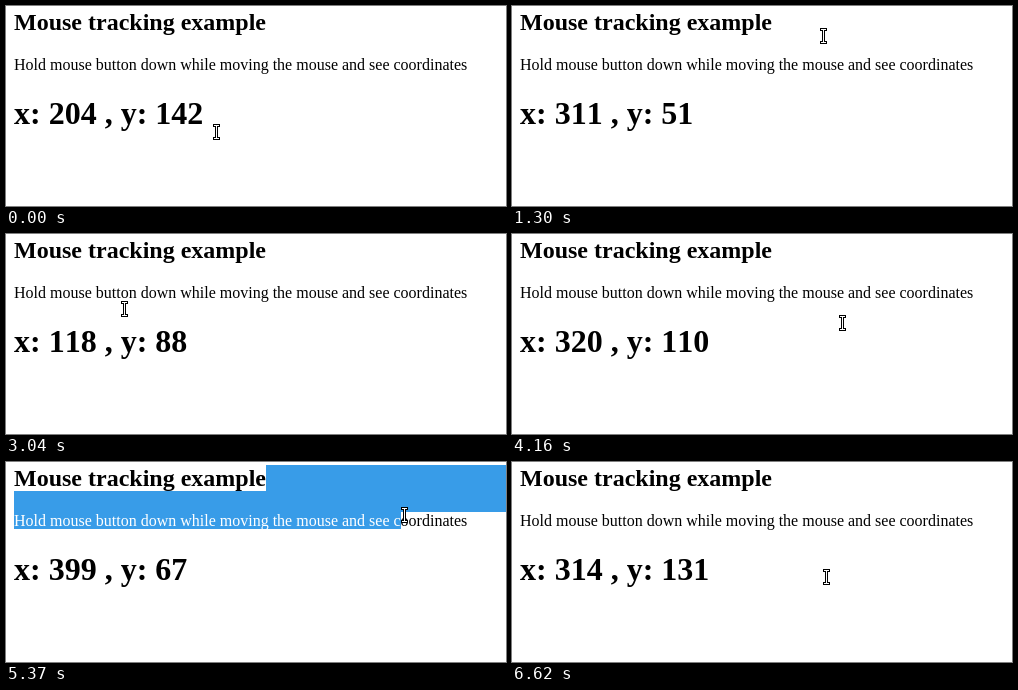
Recreate the animation shown at these times as an HTML page. Size 500 by 200 pixels, loop 6.66 s.

```html
<!DOCTYPE html>
<html lang="en">
<head>
<meta charset="utf-8">
<title>Mouse tracking example</title>
<style>
  html, body { margin: 0; width: 100%; height: 100%; overflow: hidden; background: #fff; }
  svg { display: block; }
  text { font-family: "Liberation Serif", "Times New Roman", serif; font-size: 16px; white-space: pre; }
  .h1 { font-size: 32px; font-weight: bold; font-kerning: none; }
  .h2 { font-size: 24px; font-weight: bold; }
</style>
</head>
<body>
<svg width="500" height="200" viewBox="0 0 500 200">
  <g id="selection" fill="#389ce8" shape-rendering="crispEdges">
    <rect x="260" y="3" width="240" height="26"/>
    <rect x="8" y="29" width="492" height="21"/>
    <rect id="lineBox" x="8" y="50" width="492" height="17"/>
  </g>
  <text class="h2" x="8" y="24">Mouse tracking example</text>
  <text id="line" x="8" y="64"><tspan id="lit" fill="#fff"></tspan><tspan id="plain"></tspan></text>
  <text id="readout" class="h1" x="8" y="118"></text>
  <g id="cursor" shape-rendering="crispEdges">
    <path d="M-3-8h7v3h-2v10h2v3h-7v-3h2v-10h-2z"/>
    <path fill="#fff" d="M-2-7h5v1h-2v12h2v1h-5v-1h2v-12h-2z"/>
  </g>
</svg>
<script>
const LOOP = 6660, DELAY = 40, LEFT = 8, RIGHT = 500;
const SENTENCE = "Hold mouse button down while moving the mouse and see coordinates";

// Turning points and rests of the pointer: time in ms, x, y
const path = [
  [-40, 204, 126], [0, 210, 126], [360, 252, 124], [500, 252, 124],
  [940, 317, 72], [1300, 311, 30], [1440, 312, 14], [1780, 312, 14],
  [2400, 173, 17], [2500, 165, 20], [2880, 119, 64], [3040, 118, 75], [3160, 118, 88], [3530, 118, 88],
  [3860, 215, 119], [4200, 335, 84], [4600, 346, 30], [4800, 338, 13], [4910, 337, 15],
  [4950, 357, 24], [5200, 400, 44], [5530, 395, 61], [5670, 387, 70], [5920, 387, 70],
  [6550, 322, 125], [6580, 314, 115]
];

const $ = id => document.getElementById(id);
const selection = $("selection"), lineBox = $("lineBox"), line = $("line");
const lit = $("lit"), plain = $("plain"), readout = $("readout"), cursor = $("cursor");

const slope = (i, k) => (path[i + 1][k] - path[i][k]) / (path[i + 1][0] - path[i][0]);

// Flat at turning points and rests, otherwise the harmonic mean of both slopes
function tangent(i, k) {
  if (i === 0) return slope(0, k);
  if (i === path.length - 1) return slope(i - 1, k);
  const a = slope(i - 1, k), b = slope(i, k);
  return a * b <= 0 ? 0 : 2 * a * b / (a + b);
}

function pointer(t) {
  let i = 0;
  while (i < path.length - 2 && t >= path[i + 1][0]) i++;
  const p = path[i], q = path[i + 1], d = q[0] - p[0];
  const u = Math.min(1, (t - p[0]) / d), v = 1 - u;
  return [1, 2].map(k => Math.round(
    v * v * (1 + 2 * u) * p[k] + u * v * v * d * tangent(i, k) +
    u * u * (3 - 2 * u) * q[k] - u * u * v * d * tangent(i + 1, k)));
}

// Number of letters whose middle lies left of x
function lettersBefore(x) {
  let n = 0;
  while (n < SENTENCE.length &&
    (line.getStartPositionOfChar(n).x + line.getEndPositionOfChar(n).x) / 2 < x) n++;
  return n;
}

function select(t, x, y) {
  const on = t > 5000 && t < 5955 && y >= 40;
  const whole = y >= 67;
  const n = !on ? 0 : whole ? SENTENCE.length : lettersBefore(x);
  const width = whole ? RIGHT - LEFT : n && line.getSubStringLength(0, n);
  selection.style.display = on ? "" : "none";
  lineBox.setAttribute("width", width);
  lit.textContent = SENTENCE.slice(0, n);
  plain.textContent = SENTENCE.slice(n);
}

function draw(t) {
  const [x, y] = pointer(t), [px, py] = pointer(t - DELAY);
  cursor.setAttribute("transform", `translate(${x} ${y})`);
  readout.textContent = `x: ${px} , y: ${py + 16}`;
  select(t, x, y);
}

let start;
function tick(now) {
  start ??= now;
  draw((now - start) % LOOP);
  requestAnimationFrame(tick);
}
draw(0);
requestAnimationFrame(tick);
</script>
</body>
</html>
```
